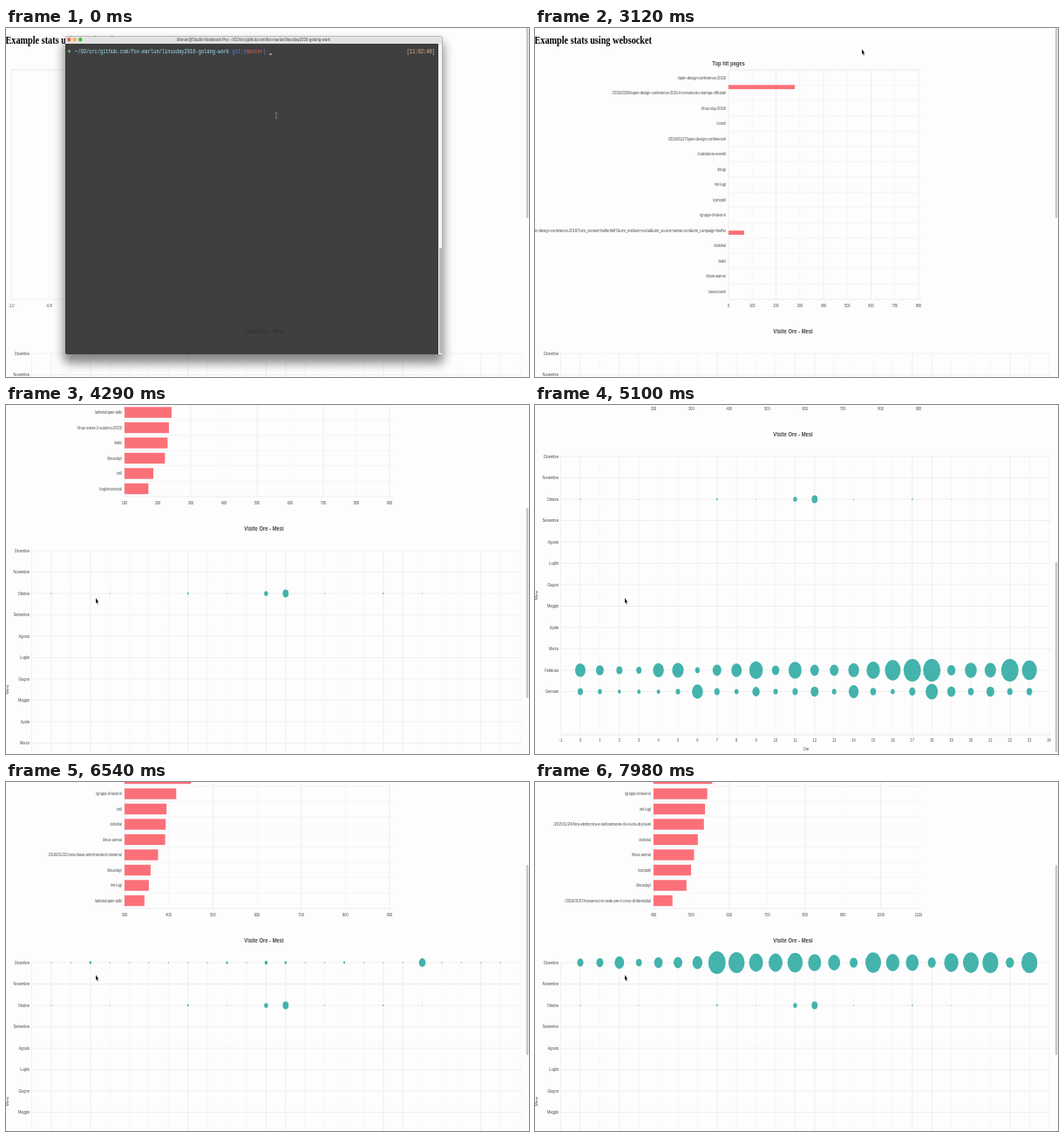
An HTML page that plays this animation: 600 by 400 pixels, repeating every 8000 ms.

```html
<!DOCTYPE html>
<html lang="it">
<head>
<meta charset="utf-8">
<title>Example stats</title>
<style>
html, body { margin: 0; width: 100%; height: 100%; overflow: hidden; background: #fdfdfe; }
svg { display: block; width: 100vw; height: 100vh; }
text { font-family: "Liberation Sans", Arial, sans-serif; font-size: 5.2px; fill: #484846; white-space: pre; }
.h { font: bold 13.3px "Liberation Serif", Times, serif; fill: #000; }
.t { font-weight: bold; font-size: 7.6px; fill: #444442; }
.m { font-family: "Liberation Mono", monospace; font-size: 6.97px; fill: #f2f2f2; }
.bar { fill: #fb7078; }
.dot { fill: #43b3ab; }
</style>
</head>
<body>
<svg id="stage" viewBox="0 0 600 400"></svg>
<script>
const stage = document.getElementById('stage');
const LOOP = 8000, TICK = 30;
const SQUEEZE = 0.77;
const HIDE_TERM = 2500, SHOW_LABELS = 2940, FIRST_BARS = 3090, LIVE = 3240;

const MONTHS = ['Dicembre', 'Novembre', 'Ottobre', 'Settembre', 'Agosto', 'Luglio',
  'Giugno', 'Maggio', 'Aprile', 'Marzo', 'Febbraio', 'Gennaio'];

const ODC = '/open-design-conference-2016/';
const PRESS = '/2016/02/06/open-design-conference-2016-il-comunicato-stampa-ufficiale/';
const JAN27 = '/2016/01/27/open-design-conference/';
const FIRST_PAGES = [ODC, PRESS, '/linux-day-2016/', '/corsi/', JAN27, '/calendario-eventi/', '/blog/',
  '/ml-lug/', '/contatti/', '/gruppi-di-lavoro/',
  ODC + '?utm_content=buffer9e87&utm_medium=social&utm_source=twitter.com&utm_campaign=buffer',
  '/attivita/', '/wiki/', '/dove-siamo/', '/associarsi/'];

// hits at each of HIT_TIMES
const HIT_TIMES = [4290, 5730, 6540, 7980];
const HITS = {
  [ODC]: [850, 870, 890, 1090],
  '/blog/': [520, 645, 720, 880],
  [JAN27]: [500, 605, 640, 690],
  [PRESS]: [480, 564, 590, 640],
  '/corsi/': [400, 504, 560, 660],
  '/calendario-eventi/': [380, 458, 520, 600],
  '/2016/01/22/corso-base-amministratori-sistema/': [370, 376, 376, 376],
  '/gruppi-di-lavoro/': [290, 351, 417, 542],
  '/attivita/': [280, 343, 393, 517],
  '/linux-arena/': [165, 327, 392, 507],
  '/ml/': [187, 309, 395, 555],
  '/attivita/open-talk/': [242, 304, 345, 420],
  '/linuxday/': [222, 303, 359, 487],
  '/wiki/': [230, 291, 335, 430],
  '/linux-arena-2-autunno-2015/': [234, 286, 320, 340],
  '/ml-lug/': [150, 270, 355, 536],
  '/tag/sicurezza/': [172, 200, 220, 240],
  '/2015/11/24/fiera-elettronica-e-radioamatore-di-s-lucia-di-piave/': [90, 270, 450, 533],
  '/contatti/': [140, 220, 330, 499],
  '/2016/01/07/troviamoci-in-sede-per-il-corso-di-libreitalia/': [80, 180, 300, 450]
};

// bubble radii per hour
const FEB = [6, 4.5, 3.5, 3, 6.2, 6.6, 2.6, 5, 6, 7.8, 4.3, 7.5, 5, 5, 6.2, 7.7, 9, 10, 10, 4.7, 6.8, 6.5, 10, 8.6];
const JAN = [3, 2.3, 1.7, 2, 2, 2.5, 6.3, 3, 2.3, 4.2, 2.5, 3, 4.5, 2.5, 5.7, 3.3, 2.3, 3.6, 7, 4.7, 3.3, 4.5, 3, 3.2];
const DEC = [3.6, 4, 5.5, 3.3, 4.8, 5, 5.7, 10, 9.3, 8, 8, 8.7, 7.5, 6.9, 4.5, 9, 7.7, 7.3, 4.6, 8.2, 9, 9.2, 4.7, 9.2];
const DEC_EARLY = { 2: 1.3, 9: 1.2, 11: 1.8, 12: 1.3, 15: 1.1, 19: 3.8 };
const OCT = { 0: .5, 3: .4, 7: .9, 9: .4, 11: 2.2, 12: 3.4, 14: .5, 17: .7, 19: .4 };

const clamp = v => Math.max(0, Math.min(1, v));
const lerp = (a, b, k) => a + (b - a) * k;
const ease = k => k * k * (3 - 2 * k);

// keys: [time, value] pairs
function track(keys, t, curve = k => k) {
  let i = 0;
  while (i < keys.length - 2 && t > keys[i + 1][0]) i++;
  const [a, b] = [keys[i], keys[i + 1]];
  return lerp(a[1], b[1], curve(clamp((t - a[0]) / (b[0] - a[0]))));
}

const esc = s => s.replace(/&/g, '&amp;').replace(/</g, '&lt;');
const text = (x, y, s, anchor = 'middle', cls = '', style = '') =>
  `<text transform="translate(${x} ${y}) scale(${SQUEEZE} 1)" text-anchor="${anchor}" class="${cls}" style="${style}">${esc(s)}</text>`;
const rect = (x, y, w, h, attrs) => `<rect x="${x}" y="${y}" width="${w}" height="${h}" ${attrs}/>`;
const line = (x1, y1, x2, y2, color = '#ebebef') =>
  `<path d="M${x1} ${y1}L${x2} ${y2}" stroke="${color}" stroke-width=".8"/>`;

const ROW = 17.5, RIGHT = 440, TOP = 48, BOTTOM = 311;
const rowY = i => 57 + i * ROW;

function barAxis(left, min, max, step, digits = 0) {
  let out = '';
  const n = Math.round((max - min) / step);
  for (let i = 0; i <= n; i++) {
    const x = lerp(left, RIGHT, i / n);
    out += line(x, TOP, x, BOTTOM, i % 2 ? '#f6f6f9' : '#e9e9ef') +
      text(x, 319.5, (min + i * step).toFixed(digits));
  }
  return out + line(left, TOP, 443, TOP, '#e2e2da') + line(left, BOTTOM, 443, BOTTOM);
}

function barRows(left, labels) {
  return labels.map((s, i) =>
    line(left, rowY(i) + ROW / 2, 443, rowY(i) + ROW / 2, '#f3f3f6') +
    text(left - 3, rowY(i) + 1.8, s, 'end')).join('');
}

function hitsAt(v, t) {
  const keys = HIT_TIMES.map((time, i) => [time, v[i]]);
  return track([[LIVE, v[0] * 0.55], ...keys], t);
}

function topPages(t) {
  const title = text(222, 42.5, 'Top hit pages', 'middle', 't');
  if (t < SHOW_LABELS) return title + barAxis(6, -1, 1, .2, 1);
  if (t < LIVE) {
    const bars = t < FIRST_BARS ? '' :
      rect(222, 65.3, 76, 4.8, 'class="bar"') + rect(222, 232.2, 18, 4.8, 'class="bar"');
    return title + barAxis(222, 0, 800, 100) + barRows(222, FIRST_PAGES) + bars;
  }
  const left = 136;
  const top = Object.entries(HITS).map(([page, v]) => [page, hitsAt(v, t)])
    .sort((a, b) => b[1] - a[1]).slice(0, 15);
  const min = Math.floor(top[14][1] / 100) * 100;
  const max = Math.ceil(top[0][1] / 100) * 100;
  return title + barAxis(left, min, max, 100) + barRows(left, top.map(p => p[0])) +
    top.map(([, v], i) =>
      rect(left, rowY(i) - 6.2, (v - min) / (max - min) * (RIGHT - left), 12.4, 'class="bar"')).join('');
}

const hourX = h => 52 + h * 22.4;
const monthY = m => 373 + m * 24.5;
const STRONG = [-1, 0, 2, 7, 11, 12, 17, 18, 22];

function bubble(h, m, r) {
  return r < .25 ? '' :
    `<ellipse cx="${hourX(h)}" cy="${monthY(m)}" rx="${r}" ry="${r / SQUEEZE}" class="dot"/>`;
}

function visits(t) {
  let out = text(296, 350, 'Visite Ore - Mesi', 'middle', 't');
  for (let h = -1; h <= 24; h++) {
    out += line(hourX(h), 373, hourX(h), 692, STRONG.includes(h) ? '#ebebe2' : '#f5f5f4');
    out += text(hourX(h), 699.8, String(h));
  }
  MONTHS.forEach((name, m) => {
    out += line(29.5, monthY(m), 592, monthY(m), '#ececea') + text(27, monthY(m) + 1.6, name, 'end');
  });
  out += line(29.5, 692, 592, 692, '#e2e2dc');
  out += text(311, 710, 'Ore');
  out += `<text transform="translate(3.2 532) scale(${SQUEEZE} 1) rotate(-90)" text-anchor="middle">Mesi</text>`;
  if (t < LIVE) return out;

  for (const h in OCT) out += bubble(+h, 2, OCT[h] * Math.sqrt(clamp((t - LIVE) / 700)));
  const jan = Math.sqrt(clamp((t - 3300) / 1300)), feb = Math.sqrt(clamp((t - 3700) / 1400));
  const start = clamp((t - 6200) / 340), grow = clamp((t - 6540) / 1440);
  for (let h = 0; h < 24; h++) {
    const early = (DEC_EARLY[h] || .6) * start;
    out += bubble(h, 11, JAN[h] * jan) + bubble(h, 10, FEB[h] * feb);
    out += bubble(h, 0, Math.sqrt(lerp(early ** 2, DEC[h] ** 2, grow)));
  }
  return out;
}

const REPO = '~/GO/src/github.com/fox-marlun/linuxday2016-golang-work';
const COMMAND = 'go run *.go';

function terminal(t) {
  const typed = COMMAND.slice(0, Math.floor(clamp((t - 500) / 1200) * COMMAND.length));
  const entered = t > 1950;
  const cw = 6.97 * .6 * SQUEEZE;
  const mono = (x, s, color, anchor = 'start') => text(x, 28.7, s, anchor, 'm', `fill:${color}`);
  const caretX = entered ? 71 : 302 + typed.length * cw;
  const lights = ['#f0583f', '#efb93a', '#3fb944'].map((c, i) =>
    `<ellipse cx="${72.3 + i * 6.5}" cy="13.3" rx="2" ry="2.4" fill="${c}"/>`).join('');
  return rect(66, 16, 436, 368, 'rx="5" fill="#5c5c5c" opacity=".75" filter="url(#soft)"') +
    rect(68, 9.5, 432.5, 364.5, 'rx="2" fill="#3f3f40"') +
    `<path d="M68 18V12q0-2.5 2.5-2.5H498q2.5 0 2.5 2.5V18Z" fill="#e2e2e2"/>` + lights +
    text(284, 15, 'dlorum@Studio-Notebook-Pro: ' + REPO, 'middle', '', 'font-size:5.7px') +
    rect(496, 18, 4.5, 356, 'fill="#f6f6f6"') +
    rect(497, 252, 3, 121, 'rx="1.5" fill="#b8b8b6"') +
    text(296, 349.8, 'Visite Ore - Mesi', 'middle', 't', 'fill:#343435') +
    `<path d="M70.5 26.7h3M72 25l2 1.7l-2 1.7" stroke="#5fe05a" fill="none"/>` +
    mono(79, REPO, '#9fe2ee') + mono(259.5, 'git:(', '#4f8fd8') +
    mono(259.5 + 5 * cw, 'master', '#e8604a') + mono(259.5 + 11 * cw, ')', '#4f8fd8') +
    mono(302, typed, '#f2f2f2') + mono(492, '[11:02:40]', '#f4bc8c', 'end') +
    rect(caretX, entered ? 37.5 : 29.6, 3, .9, 'fill="#f4f4f4"');
}

function pointer(t) {
  if (t < HIDE_TERM - 200) {
    return `<path d="M308.8 97q1.2 0 1.2 1v5q0 1-1.2 1M311.2 97q-1.2 0-1.2 1M310 103q0 1 1.2 1" fill="none" stroke="#a3a37c" stroke-width=".6"/>`;
  }
  const x = track([[2300, 310], [2800, 375], [3300, 375], [3700, 103]], t, ease);
  const y = track([[2300, 97], [2800, 24], [3300, 24], [3700, 221]], t, ease);
  return `<path transform="translate(${x} ${y})" d="M0 0V6.2L1.1 5.2L2 7.4L2.9 7L2 4.8H3.4Z" fill="#000" stroke="#fff" stroke-width=".25"/>`;
}

const SCROLL = [[3850, 0], [4290, 206], [4530, 314], [5250, 314], [5690, 65], [6080, 65], [6480, 166]];
const DEFS = '<defs><filter id="soft" x="-10%" y="-10%" width="120%" height="120%"><feGaussianBlur stdDeviation="6"/></filter></defs>';

function draw(t) {
  const scroll = track(SCROLL, t, ease);
  stage.innerHTML = DEFS + rect(0, 0, 600, 400, 'fill="#fdfdfe"') +
    `<g transform="translate(0 ${-scroll})">` +
    text(-.5, 18.2, 'Example stats using websocket', 'start', 'h') + topPages(t) + visits(t) + '</g>' +
    rect(596.8, scroll * .573, 2.6, 218, 'rx="1.3" fill="#c8c8c4"') +
    (t < HIDE_TERM ? terminal(t) : '') + pointer(t);
}

const begin = performance.now();
function frame() {
  const t = (performance.now() - begin) % LOOP;
  draw(Math.floor(t / TICK) * TICK);
  requestAnimationFrame(frame);
}
frame();
</script>
</body>
</html>
```
